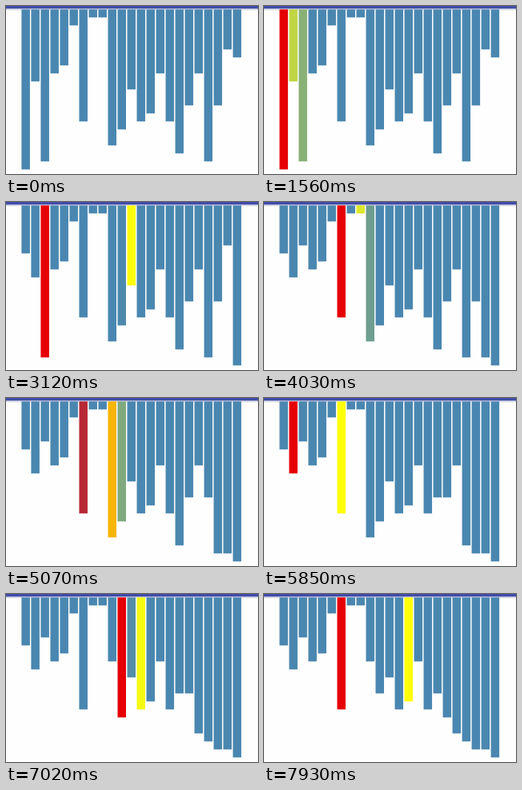
Recreate the animation shown at these times as a matplotlib script. Size 315 by 210 pixels, loop 8 s.

```python
import numpy as np
import matplotlib.pyplot as plt
from matplotlib.animation import FuncAnimation
from matplotlib.colors import to_rgb
from matplotlib.patches import Rectangle

W, H, DPI = 315, 210, 100
LOOP, TICK = 8000, 20
HOLD = 130                   # ms each picture stays
START, PACE = 1456, 49.45    # ms before sorting, ms per comparison
LEFT, TOP, PITCH, BAR, UNIT = 19.4, 4.3, 12.01, 10.5, 10

BLUE, RED, YELLOW = (to_rgb(c) for c in ("#4a87b0", "#e60004", "#ffff08"))

VALUES = [20, 9, 19, 8, 7, 2, 14, 1, 1, 17, 15, 10,
          14, 13, 8, 14, 18, 12, 8, 19, 12, 5, 6]


def selection_sort(values):
    """Yield (heights, colours) for the idle state and every comparison."""
    a = list(values)
    yield np.array(a, float), np.array([BLUE] * len(a))
    for end in range(len(a) - 1, 0, -1):
        top = 0
        for j in range(1, end + 1):
            colours = np.array([BLUE] * len(a))
            colours[top] = RED
            colours[j] = YELLOW
            yield np.array(a, float), colours
            if a[j] > a[top]:
                top = j
        a[top], a[end] = a[end], a[top]


STATES = list(selection_sort(VALUES))


def state_at(ms):
    """Ease each state into the next over one comparison."""
    k, u = divmod((ms - START) / PACE, 1)
    k = int(k)
    if k < 1:
        return STATES[0]
    e = 1 - (1 - u) ** 4
    return tuple((1 - e) * p + e * q for p, q in zip(STATES[k - 1], STATES[k]))


fig = plt.figure(figsize=(W / DPI, H / DPI), dpi=DPI, facecolor="#fefefe")
ax = fig.add_axes([0, 0, 1, 1])
ax.set(xlim=(0, W), ylim=(H, 0))
ax.axis("off")


def add_box(x, y, w, h, colour):
    return ax.add_patch(Rectangle((x, y), w, h, fc=colour, lw=0, snap=False))


# Toolbar edge and its shadow
add_box(0, 0, W, 3, "#414caa")
for row, colour in enumerate(("#b0b4d4", "#dcdfe8", "#f5f5f8"), start=3):
    add_box(0, row, W, 1, colour)

bars = [add_box(LEFT + PITCH * i, TOP, BAR, UNIT * v, BLUE)
        for i, v in enumerate(VALUES)]


def update(frame):
    ms = (frame + 0.5) * TICK
    heights, colours = state_at(ms // HOLD * HOLD)
    for bar, h, c in zip(bars, heights, colours):
        bar.set_height(UNIT * h)
        bar.set_facecolor(c)
    return bars


anim = FuncAnimation(fig, update, frames=LOOP // TICK, interval=TICK,
                     repeat=True, repeat_delay=0, blit=False)
plt.show()
```
